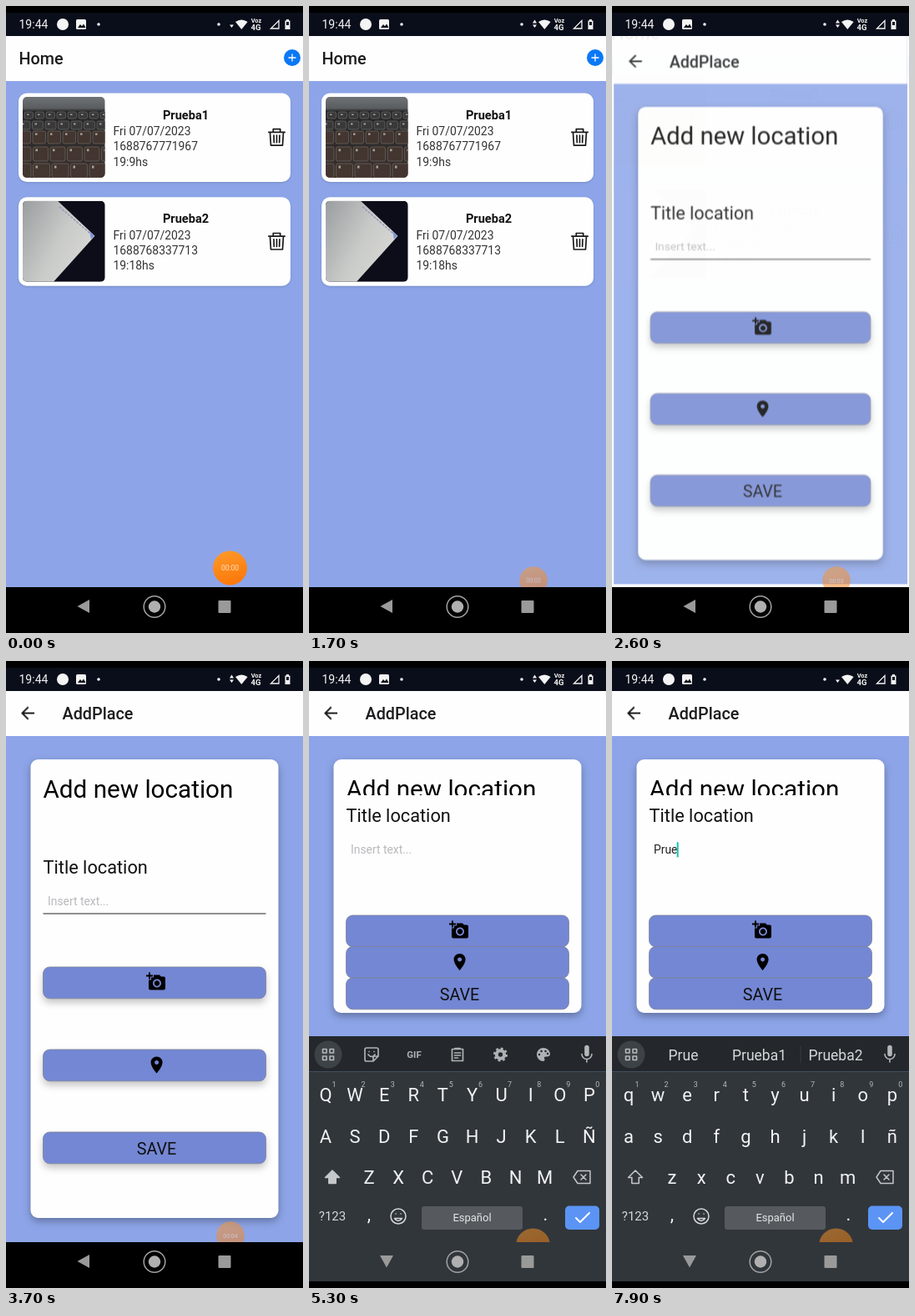
These frames come from a looping animation (356x752 px, 8 s). An HTML page:

```html
<!DOCTYPE html>
<html lang="es">
<head>
<meta charset="utf-8">
<title>Add a place</title>
<style>
html, body { margin: 0; width: 100%; height: 100%; overflow: hidden; background: #000; }
svg { display: block; }
#stage { width: 356px; height: 752px; font-family: Roboto, "Noto Sans", sans-serif; }
.mid { text-anchor: middle; }
.bold { font-weight: 700; }
.head { font-size: 19.8px; font-weight: 500; fill: #1c1c1e; }
.line { fill: none; stroke-linecap: round; stroke-linejoin: round; }
.name { font-size: 14.6px; font-weight: 700; fill: #111; text-anchor: middle; }
.info { font-size: 13.9px; fill: #333; }
.card { fill: #fefefe; filter: drop-shadow(0 1px 1.5px rgba(0, 0, 0, .14)); }
#sheet { fill: #fefefe; filter: drop-shadow(0 4px 5px rgba(0, 0, 0, .3)); }
.btn rect { fill: #7487d4; stroke: #7b8098; stroke-width: .8; filter: drop-shadow(0 5px 4px rgba(0, 0, 0, .22)); }
.key { font-size: 22px; fill: #f1f2f3; text-anchor: middle; }
.hint { font-size: 9px; fill: #b3b7ba; text-anchor: middle; }
.word { font-size: 17.5px; fill: #d5d8da; text-anchor: middle; }
#shift.caps { fill: #c5c8ca; }

/* layout while the keyboard is open */
.typing-only { visibility: hidden; }
.typing .typing-only { visibility: visible; }
.typing .form-only { visibility: hidden; }
.typing #sheet { height: 304px; }
.typing #field { transform: translateY(-61.7px); }
.typing #b0 { transform: translateY(305px); }
.typing #b1 { transform: translateY(342.5px); }
.typing #b2 { transform: translateY(380px); }
.typing .btn rect { filter: none; }
#b0 { transform: translateY(367px); }
#b1 { transform: translateY(466px); }
#b2 { transform: translateY(565px); }
#back { transform: translate(93px, 720px); }
.typing #back { transform: translate(93px, 720px) rotate(-90deg); }

#home, #add { transform-origin: 178px 366px; }
#home { animation: leave 8s linear infinite; }
#add { animation: enter 8s linear infinite; }
.late { animation: late 8s step-end infinite; }
#board { animation: rise 8s linear infinite; }
#bubble { animation: bubble 8s linear infinite; }
@keyframes leave {
  0%, 30% { transform: scale(1); opacity: 1; }
  31.25% { transform: scale(1.06); opacity: .37; }
  32.75%, 100% { transform: scale(1.11); opacity: 0; }
}
@keyframes enter {
  0%, 30% { transform: scale(.85); opacity: 0; }
  31.25% { transform: scale(.97); opacity: .44; }
  33% { transform: scale(.995); opacity: 1; }
  34.5%, 100% { transform: scale(1); opacity: 1; }
}
@keyframes late { 0% { opacity: 0; } 32% { opacity: 1; } }
@keyframes rise {
  0%, 64.4% { transform: translateY(310px); }
  65% { transform: translateY(90px); }
  66%, 100% { transform: translateY(0); }
}
@keyframes bubble {
  0%, 12.5% { transform: translate(268.5px, 674px) scale(1); opacity: 1; }
  16.25%, 64.9% { transform: translate(269px, 689px) scale(.82); opacity: .5; }
  65.1%, 100% { transform: translate(268.5px, 701px) scale(1); opacity: .52; }
}
</style>
</head>
<body>
<svg id="stage" viewBox="0 0 356 752">
  <defs>
    <clipPath id="view"><rect y="36" width="356" height="661"/></clipPath>
    <clipPath id="low"><rect width="356" height="744"/></clipPath>
    <clipPath id="thumb"><rect x="20" y="109" width="98.500" height="97" rx="5"/></clipPath>
    <linearGradient id="paper" x2="1" y2=".6">
      <stop stop-color="#9a9e9f"/><stop offset=".6" stop-color="#c9cbc9"/><stop offset="1" stop-color="#d8d8d6"/>
    </linearGradient>
    <linearGradient id="laptop" x2="0" y2="1">
      <stop stop-color="#707375"/><stop offset=".14" stop-color="#5a5d5f"/>
      <stop offset=".18" stop-color="#26282a"/><stop offset="1" stop-color="#3a302c"/>
    </linearGradient>
    <linearGradient id="orange" x2=".3" y2="1">
      <stop stop-color="#ff9a2c"/><stop offset="1" stop-color="#fb7a0c"/>
    </linearGradient>
    <g id="bin" class="line" stroke="#1a1a1a" stroke-width="1.700">
      <path d="M314.800 151.300h19.400M320.300 151v-3.300h8.400v3.300M316.500 151.500l1 15.700h14l1-15.700M321 155l.3 8.700M324.500 155v8.700M328 155l-.3 8.700"/>
    </g>
  </defs>

  <g clip-path="url(#view)">
    <rect y="36" width="356" height="661" fill="#fff"/>
    <g id="home">
      <rect y="36" width="356" height="661" fill="#8da5e8"/>
      <rect y="36" width="356" height="54" fill="#fefefe"/>
      <text class="head" x="15.500" y="70">Home</text>
      <circle cx="343" cy="62" r="10" fill="#0a78f5"/>
      <path d="M338.500 62h9M343 57.500v9" stroke="#fff" stroke-width="1.300"/>
      <rect class="card" x="15" y="104.500" width="326" height="106.500" rx="10"/>
      <g clip-path="url(#thumb)" id="photo"></g>
      <text class="name" x="215.500" y="135.500">Prueba1</text>
      <text class="info" x="128.500" y="155">Fri 07/07/2023</text>
      <text class="info" x="128.500" y="173">1688767771967</text>
      <text class="info" x="128.500" y="191.500">19:9hs</text>
      <use href="#bin"/>
      <g transform="translate(0 124.800)">
        <rect class="card" x="15" y="104.500" width="326" height="106.500" rx="10"/>
        <g clip-path="url(#thumb)">
          <rect x="20" y="109" width="99" height="97" fill="#0c0d18"/>
          <path d="M20 109H62L106.500 151 57 206H20z" fill="url(#paper)"/>
          <path d="M64 116L102 149" stroke="#8c92b8" stroke-width="1.200" stroke-dasharray="3 1.500"/>
          <path d="M100 145l6 6-4 4z" fill="#7f93d2"/>
        </g>
        <text class="name" x="215.500" y="135.500">Prueba2</text>
        <text class="info" x="128.500" y="155">Fri 07/07/2023</text>
        <text class="info" x="128.500" y="173">1688768337713</text>
        <text class="info" x="128.500" y="191.500">19:18hs</text>
        <use href="#bin"/>
      </g>
    </g>

    <g id="add">
      <rect y="36" width="356" height="661" fill="#8da5e8"/>
      <rect y="36" width="356" height="54" fill="#fefefe"/>
      <path class="late" transform="translate(14 50.500)" d="M20 11H7.830l5.590-5.590L12 4l-8 8 8 8 1.410-1.410L7.830 13H20z" fill="#1c1c1e"/>
      <text class="head" x="67.500" y="70">AddPlace</text>
      <rect id="sheet" x="29.500" y="118" width="297" height="550" rx="9"/>
      <text x="44.500" y="164" font-size="29.670">Add new location</text>
      <rect class="typing-only" x="40" y="161" width="275" height="16" fill="#fefefe"/>
      <g id="field">
        <text x="44.500" y="255" font-size="21.760" fill="#111">Title location</text>
        <text id="input" x="50" y="292.500" font-size="13.850" fill="#b9b9bd">Insert text...</text>
        <rect id="caret" y="279" width="2" height="18" fill="#17c3ae"/>
      </g>
      <path class="form-only late" d="M44.500 303H311.500" stroke="#222" stroke-width="1.200"/>
      <g class="btn" id="b0">
        <rect x="44.500" width="267" height="37.800" rx="8"/>
        <path transform="translate(168 5.500)" d="M3 4V1h2v3h3v2H5v3H3V6H0V4zM6 10V7h3V4h7l1.830 2H21c1.100 0 2 .9 2 2v12c0 1.100-.9 2-2 2H5c-1.100 0-2-.9-2-2V10zm7 9c2.760 0 5-2.240 5-5s-2.240-5-5-5-5 2.240-5 5 2.240 5 5 5zm-3.200-5c0 1.770 1.430 3.200 3.200 3.200s3.200-1.430 3.200-3.200-1.430-3.200-3.200-3.200-3.200 1.430-3.200 3.200z"/>
      </g>
      <g class="btn" id="b1">
        <rect x="44.500" width="267" height="37.800" rx="8"/>
        <path transform="translate(168.600 6.600)" d="M12 2C8.130 2 5 5.130 5 9c0 5.250 7 13 7 13s7-7.750 7-13c0-3.870-3.130-7-7-7zm0 9.500c-1.380 0-2.500-1.120-2.500-2.500s1.120-2.500 2.500-2.500 2.500 1.120 2.500 2.500-1.120 2.500-2.500 2.500z"/>
      </g>
      <g class="btn" id="b2">
        <rect x="44.500" width="267" height="37.800" rx="8"/>
        <text class="mid" x="180.500" y="27" font-size="19.780" fill="#111">SAVE</text>
      </g>
    </g>
  </g>

  <rect y="697" width="356" height="55"/>

  <g clip-path="url(#low)">
    <g id="board">
      <rect y="450" width="356" height="42.500" fill="#24282c"/>
      <rect y="492.500" width="356" height="252" fill="#31363b"/>
      <circle cx="23" cy="472" r="16.500" fill="#3d4246"/>
      <g class="line" stroke="#b4b8bb" stroke-width="1.600">
        <path d="M16.500 465.500h4.500v4.500h-4.500zM25 465.500h4.500v4.500h-4.500zM16.500 474h4.500v4.500h-4.500zM25 474h4.500v4.500h-4.500z"/>
        <path d="M333 463.500v8" stroke-width="5.500"/>
        <path d="M327 471.500a6 6 0 0 0 12 0M333 477.500v3.500"/>
      </g>
      <g id="tools" class="line" stroke="#aeb2b5" stroke-width="1.700">
        <path d="M69 464h12q2 0 2 2v8l-6 6h-8q-2 0-2-2v-12q0-2 2-2zM71 472q4 5 8 0M72 468.500h.1M78 468.500h.1M83 474h-4q-2 0-2 2v4"/>
        <text class="mid bold" x="126" y="476" font-size="11.500" fill="#aeb2b5" stroke="none">GIF</text>
        <path d="M171.500 465.500h13v14h-13zM175 464.500h6M174.500 470h7M174.500 473h7M174.500 476h4"/>
        <circle cx="229.500" cy="472" r="4.700" stroke-width="4"/>
        <circle cx="229.500" cy="472" r="7" stroke-width="3" stroke-linecap="butt" stroke-dasharray="2.750"/>
        <path d="M281 464a8 8 0 1 0 0 16q2.500-1 1-3.500-.5-2 2-2h2q3-.5 3-3.500a8 7.500 0 0 0-8-7z" fill="#aeb2b5" stroke="none"/>
        <path d="M276 472h.1M278.500 468h.1M283.500 468h.1M286 471h.1" stroke="#24282c" stroke-width="2.400"/>
      </g>
      <g id="words">
        <path d="M226 462v20" stroke="#353a3e"/>
        <text class="word" x="85.500" y="479"></text>
        <text class="word" x="176.500" y="479"></text>
        <text class="word" x="268" y="479"></text>
      </g>
      <g id="keys"></g>
      <path id="shift" class="line" d="M28 611l8.500 8.500h-4.300v7h-8.400v-7h-4.300z" stroke="#c5c8ca" stroke-width="1.500"/>
      <path class="line" d="M322 611.500h15v15h-15l-5-7.500zM326 616l6 6M332 616l-6 6" stroke="#c5c8ca" stroke-width="1.500"/>
      <text class="mid" x="28" y="671" font-size="15" fill="#d5d8da">?123</text>
      <text class="key" x="72" y="671" font-size="18">,</text>
      <g class="line" stroke="#d5d8da" stroke-width="1.500">
        <circle cx="107" cy="666" r="9"/>
        <path d="M102.500 668.500q4.500 6 9 0zM104 663h.1M110 663h.1"/>
      </g>
      <rect x="135" y="654" width="121" height="28" rx="3" fill="#565a5f"/>
      <text class="mid" x="195.500" y="672" font-size="13" fill="#e4e6e7">Español</text>
      <text class="key" x="283.500" y="671">.</text>
      <rect x="307" y="653.500" width="41" height="28.500" rx="5" fill="#5b94f5"/>
      <path class="line" d="M320 668l5 5 11-11" stroke="#fff" stroke-width="2"/>
      <g id="popup">
        <path d="M-19 545V437q0-4 4-4H15q4 0 4 4V545z" fill="#24282c"/>
        <text class="mid" y="470" font-size="28" fill="#f1f2f3"></text>
        <text class="mid" x="10.500" y="480" font-size="14" fill="#d5d8da">…</text>
      </g>
    </g>
  </g>

  <g clip-path="url(#view)">
    <g id="bubble">
      <circle r="20.500" fill="url(#orange)"/>
      <text id="timer" class="mid" y="3.200" font-size="8.500" fill="#ffe2c4"></text>
    </g>
  </g>

  <path id="back" d="M-7.500 0L7 -8V8z" fill="#9a9a9a"/>
  <circle cx="178" cy="720.500" r="12.800" fill="none" stroke="#a2a2a2" stroke-width="1.500"/>
  <circle cx="178" cy="720.500" r="7.200" fill="#b0b0b0"/>
  <rect x="254.500" y="713" width="15" height="15" rx="1" fill="#9a9a9a"/>

  <rect width="356" height="8"/>
  <rect y="8" width="356" height="28" fill="#0a0e1a"/>
  <g fill="#f4f4f4">
    <text x="15.500" y="27" font-size="14">19:44</text>
    <circle cx="68" cy="22" r="7"/>
    <rect x="84" y="16" width="12" height="12" rx="1.500"/>
    <path d="M86 26l3-4 2 2.300 2-2.800 2.500 4.500z" fill="#0a0e1a"/>
    <circle cx="111" cy="22" r="1.800"/>
    <circle cx="255" cy="22" r="1.800"/>
    <path id="up" d="M268 20.500h5l-2.500-4z"/>
    <path d="M268 22.500h5l-2.500 3.500z"/>
    <path d="M275 19q7.300-5 14.600 0l-7.300 9z"/>
    <text class="mid bold" x="300" y="20" font-size="7.500">Voz</text>
    <text class="mid bold" x="299.500" y="29" font-size="9.500">4G</text>
    <path d="M317.500 27h9.500V17.500z" fill="none" stroke="#f4f4f4" stroke-width="1.300"/>
    <path d="M334.500 17.500h1.500v-1.500h3v1.500h1.500v10.500h-6zm1.500 1.500v4h3v-4z" fill-rule="evenodd"/>
  </g>
</svg>
<script>
const LOOP = 8000, OPEN = 5200;
const $ = id => document.getElementById(id);
const rows = [
  { chars: 'qwertyuiop', x: 20, y: 528 },
  { chars: 'asdfghjklñ', x: 20, y: 577.5 },
  { chars: 'zxcvbnm', x: 72, y: 626.5 }
];
const keyX = (row, i) => row.x + i * 35.1;

// [finger down, finger up, key, suggestions after it]
const taps = [
  [6450, 6600, 'P', ['P', 'Pero', 'Porque']],
  [6830, 6990, 'r', ['Pr', 'Pero', 'Prueba1']],
  [7150, 7290, 'u', ['Pru', 'Prueba1', 'Prueba2']],
  [7450, 7590, 'e', ['Prue', 'Prueba1', 'Prueba2']]
];

$('keys').innerHTML = rows.map((row, r) => [...row.chars].map((c, i) => {
  const x = keyX(row, i);
  const hint = r ? '' : `<text class="hint" x="${x + 10}" y="511">${(i + 1) % 10}</text>`;
  return `<text class="key" x="${x}" y="${row.y}">${c}</text>${hint}`;
}).join('')).join('');
const letters = [...document.querySelectorAll('#keys .key')];
const words = [...document.querySelectorAll('#words text')];
const popupChar = document.querySelector('#popup text');

// laptop thumbnail: rows of keys growing towards the viewer
function drawPhoto() {
  let s = '<rect x="20" y="109" width="99" height="97" fill="url(#laptop)"/>';
  [[127, 8, 13], [138, 10, 15.5], [150, 15, 18], [169, 17, 20.5], [189, 17, 22.5]].forEach(([y, h, w], r) => {
    for (let i = 0, x = 17 + r * 7 % 9 - 8; x < 119; i++, x += w) {
      s += `<rect x="${x}" y="${y}" width="${w - 2.5}" height="${h}" rx="2" fill="${r < 2 ? '#39393a' : '#43352f'}" stroke="#77726e" stroke-width=".6"/>`
         + `<rect x="${x + 3}" y="${y + 2.5}" width="2.5" height="${1.5 + r * .4}" fill="#a8a39e"/>`;
    }
  });
  $('photo').innerHTML = s;
}

const show = (node, on) => { node.style.display = on ? '' : 'none'; };
const put = (node, text) => { if (node.textContent !== text) node.textContent = text; };

function draw(t) {
  const done = taps.filter(tap => t >= tap[1]);
  const held = taps.find(tap => t >= tap[0] && t < tap[1]);
  const typed = done.map(tap => tap[2]).join('');
  const upper = !typed;

  $('stage').classList.toggle('typing', t >= OPEN);
  put($('timer'), '00:0' + Math.floor(t / 1000 + .5));
  show($('up'), t >= 1000 && t < 6100);

  put($('input'), typed || 'Insert text...');
  $('input').setAttribute('fill', typed ? '#222' : '#b9b9bd');
  $('caret').setAttribute('x', typed ? 49.3 + $('input').getComputedTextLength() : 49);
  show($('caret'), typed || t >= 5500 && t < 6000);

  show($('tools'), !typed);
  show($('words'), typed);
  if (typed) done[done.length - 1][3].forEach((w, i) => put(words[i], w));
  letters.forEach(n => put(n, upper ? n.textContent.toUpperCase() : n.textContent.toLowerCase()));
  $('shift').classList.toggle('caps', upper);

  show($('popup'), held);
  if (held) {
    const i = rows[0].chars.indexOf(held[2].toLowerCase());
    $('popup').setAttribute('transform', `translate(${keyX(rows[0], i)} 0)`);
    put(popupChar, held[2]);
  }
}

drawPhoto();
draw(0);
let start;
requestAnimationFrame(function tick(now) {
  start ??= now;
  draw((now - start) % LOOP);
  requestAnimationFrame(tick);
});
</script>
</body>
</html>
```
